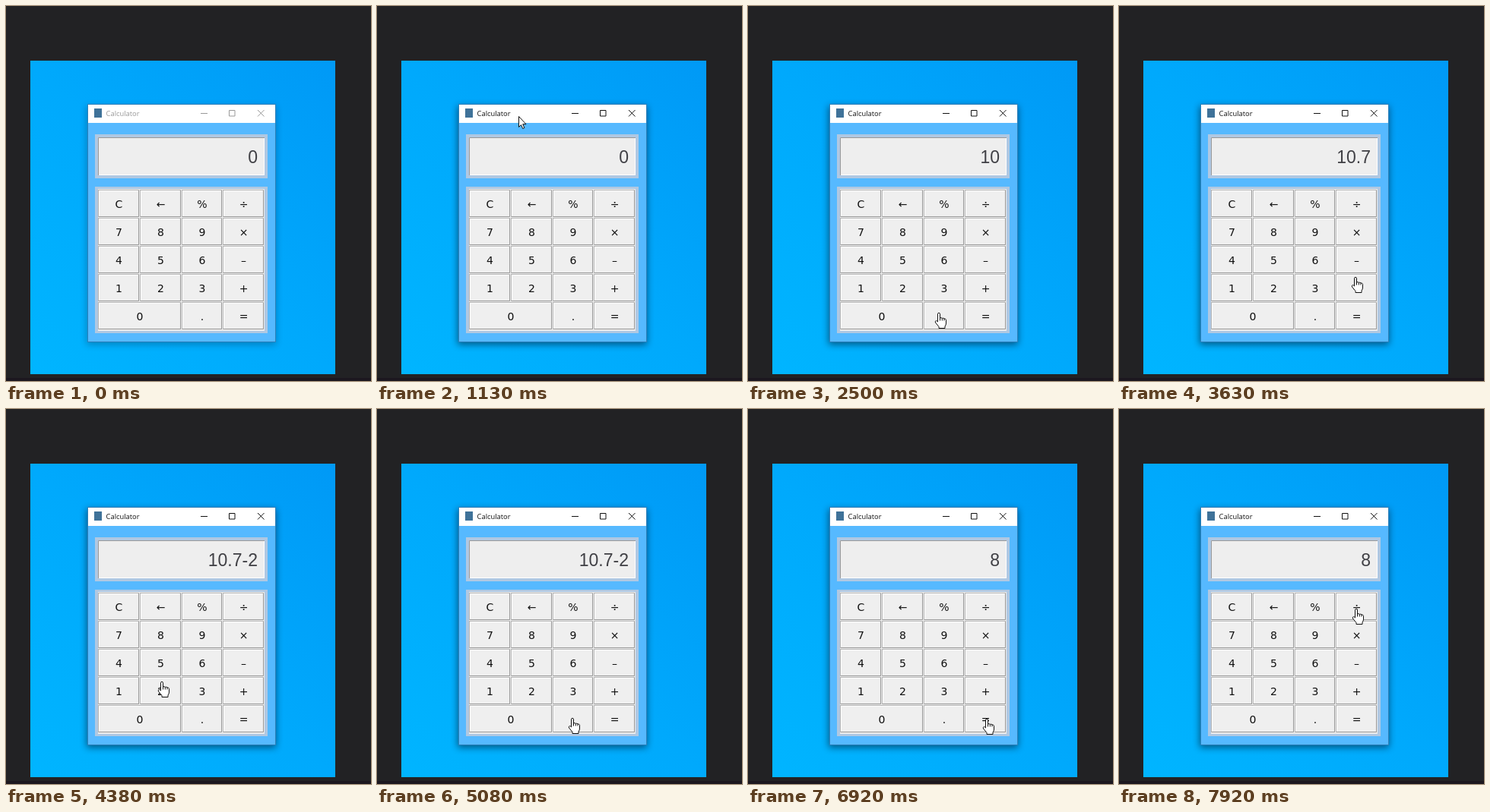
An HTML page that plays this animation: 480 px wide and 494 px high, repeating every 8000 ms.

```html
<!DOCTYPE html>
<html lang="en">
<head>
<meta charset="utf-8">
<title>Calculator</title>
<style>
  html, body { margin: 0; width: 100%; height: 100%; overflow: hidden; background: #222224; }
  svg { display: block; }
  .shadow { fill: #00182c; filter: blur(5px); }
  .title { font: 9.4px "Open Sans", "Noto Sans", sans-serif; }
  .chrome { fill: none; stroke: currentColor; stroke-width: 1; }
  .key { font: 14px "DejaVu Sans", sans-serif; text-anchor: middle; fill: #111; }
  .screen { font: 23px "Liberation Sans", Arial, sans-serif; text-anchor: end; fill: #414146; }
  .light { fill: none; stroke: #fff; }
  .dark { fill: none; stroke: #999; }
  .down .light { stroke: #999; }
  .down .dark { stroke: #fff; }
  .down text { transform: translate(1px, 1px); }
  #pointer path { fill: #fff; stroke: #111; stroke-linejoin: round; }
</style>
</head>
<body>
<svg width="480" height="494" viewBox="0 0 480 494">
  <defs>
    <linearGradient id="sky" x1="0" y1="1" x2="1" y2="0">
      <stop offset="0" stop-color="#00b5ff"/>
      <stop offset=".5" stop-color="#00a9fc"/>
      <stop offset="1" stop-color="#0099f6"/>
    </linearGradient>
    <clipPath id="desktop"><rect x="32" y="72" width="401" height="413"/></clipPath>
  </defs>
  <rect width="480" height="494" fill="#222224"/>
  <rect y="490" width="480" height="4" fill="#1c171f"/>
  <g clip-path="url(#desktop)">
    <rect x="32" y="72" width="401" height="413" fill="url(#sky)"/>
    <rect id="shadow" class="shadow" x="106" y="132" width="249" height="314"/>

    <rect x="107.5" y="129.5" width="247" height="313" fill="#56b9ff" stroke="#2d7fb8"/>
    <rect x="108" y="130" width="246" height="24" fill="#fff"/>
    <rect x="116" y="135" width="10" height="12" fill="#3f7299"/>
    <g id="caption">
      <text class="title" x="131.5" y="145" fill="currentColor">Calculator</text>
      <path class="chrome" d="M256 141.5h9M293.5 137.5h7.5v7.5h-7.5zM331 137l8.5 8.5m0-8.5l-8.5 8.5"/>
    </g>

    <rect x="117" y="169" width="227" height="58" fill="#b0c8e2"/>
    <rect x="121" y="173" width="219" height="50" fill="#eee"/>
    <path class="dark" d="M121.5 223V173.5H340"/>
    <path class="light" d="M122 222.5H339.500V174"/>
    <text id="screen" class="screen" x="331" y="206.500">0</text>

    <rect x="117" y="238" width="227" height="193" fill="#b0c8e2"/>
    <rect x="121" y="241" width="219" height="187" fill="#ececec"/>
    <g id="keys"></g>

    <g id="pointer">
      <path id="arrow" d="M.5.5V14.500L3.500 11.600 5.700 16.500 7.900 15.500 5.700 10.700H10z"/>
      <path id="hand" d="M-1.500 12V1.800a1.500 1.500 0 0 1 3 0V7q1.600-1 2.800.4 1.600-.8 2.700.5 2-.2 2.500 1.500V14q0 2-1.500 4v2.500H0v-2L-4.500 13q-.8-2 .8-2.400 1 0 2.200 1.400M1.500 7v3.500M4.300 7.500v3M7 8v2.500"/>
    </g>
  </g>
</svg>
<script>
const LOOP = 8000;
const $ = id => document.getElementById(id);

const rows = ["C←%÷", "789×", "456–", "123+", "0 .="];
const columns = [121, 176, 231, 285, 340];
const keys = {};

function addKey(label, x, y, width) {
  const right = x + width - 1.5, bottom = y + 35.5;
  $("keys").insertAdjacentHTML("beforeend", `<g>
    <rect x="${x}" y="${y}" width="${width - 1}" height="36" fill="#efefef"/>
    <rect x="${x + .5}" y="${y + .5}" width="${width - 2}" height="35" fill="none" stroke="#b4b4b4"/>
    <path class="light" d="M${x + 1.5} ${bottom - 1}V${y + 1.5}H${right - 1}"/>
    <path class="dark" d="M${x + 1} ${bottom}H${right}V${y + 1}"/>
    <text class="key" x="${x + width / 2}" y="${y + 24}">${label}</text></g>`);
  keys[label] = $("keys").lastElementChild;
}

rows.forEach((row, r) => [...row].forEach((label, c) => {
  if (label === " ") return;
  const end = r === 4 && c === 0 ? 2 : c + 1;
  addKey(label, columns[c], Math.round(242 + r * 36.9), columns[end] - columns[c]);
}));

// Key, press time, release time, resulting display
const presses = [
  ["1", 1630, 1700, "1"],
  ["0", 2030, 2100, "10"],
  [".", 2590, 2670, "10."],
  ["7", 3220, 3330, "10.7"],
  ["–", 3760, 3840, "10.7-"],
  ["2", 4170, 4260, "10.7-2"],
  [".", 5130, 5210, "10.7-2."],
  ["7", 5800, 5890, "10.7-2.7"],
  ["=", 6680, 6800, "8"]
];

// Time and pointer hot spot; equal neighbours are pauses
const route = [
  [240, 337, 70], [790, 186, 145], [1150, 186, 145], [1460, 149, 366],
  [1740, 149, 366], [1980, 146, 409], [2140, 146, 409], [2440, 251, 404],
  [2700, 251, 404], [3170, 155, 293], [3370, 155, 293], [3630, 311, 357],
  [3740, 311, 335], [3850, 311, 335], [4130, 204, 358], [4330, 204, 358],
  [4940, 257, 399], [5050, 257, 407], [5240, 257, 407], [5720, 156, 291],
  [6170, 156, 291], [6610, 314, 410], [6900, 314, 408], [7200, 314, 408],
  [7580, 318, 192], [7650, 318, 192], [7910, 312, 262.5]
];

function pointerAt(time) {
  const next = route.findIndex(point => point[0] > time);
  if (next < 0) return route.at(-1).slice(1);
  const [t0, x0, y0] = route[Math.max(0, next - 1)];
  const [t1, x1, y1] = route[next];
  const u = Math.max(0, Math.min(1, (time - t0) / (t1 - t0 || 1)));
  const k = u * u * (3 - 2 * u);
  return [x0 + (x1 - x0) * k, y0 + (y1 - y0) * k];
}

function draw(time) {
  const focus = Math.max(0, Math.min(1, (time - 950) / 160));
  $("shadow").style.opacity = .3 + .28 * focus;
  $("caption").style.color = time < 960 ? "#999" : "#111";

  $("screen").textContent = presses.findLast(press => time >= press[2])?.[3] ?? "0";
  const held = presses.find(press => time >= press[1] && time < press[2])?.[0];
  for (const label in keys) keys[label].classList.toggle("down", label === held);

  const [x, y] = pointerAt(time);
  const overKey = x > 121 && x < 340 && y > 241 && y < 428;
  $("pointer").setAttribute("transform", `translate(${Math.round(x)} ${Math.round(y)})`);
  $("pointer").style.display = time < 250 ? "none" : "";
  $("arrow").style.display = overKey ? "none" : "";
  $("hand").style.display = overKey ? "" : "none";
}

const start = performance.now();
function tick() {
  draw((performance.now() - start) % LOOP);
  requestAnimationFrame(tick);
}
tick();
</script>
</body>
</html>
```
